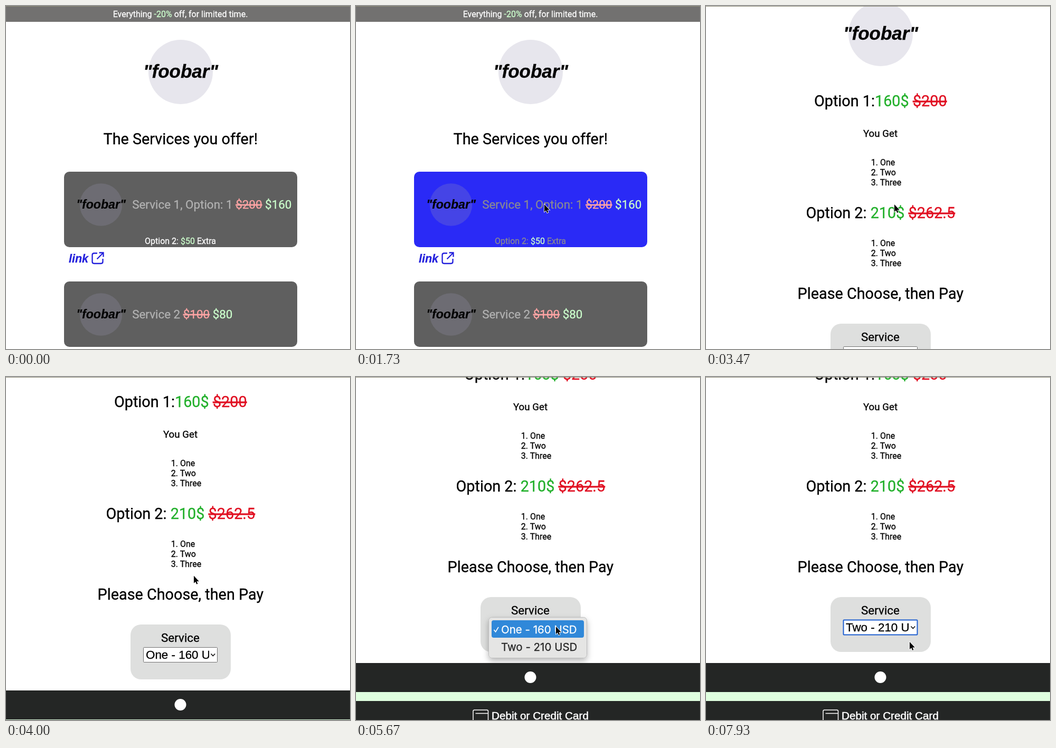
Write an HTML page that moves like this. It is 652 px wide and 650 px high and loops after 8 s.

```html
<!DOCTYPE html>
<html lang="en">
<head>
<meta charset="utf-8">
<title>Service shop</title>
<style>
  html, body { margin: 0; width: 100%; height: 100%; overflow: hidden; background: #fff; }
  svg { display: block; width: 652px; height: 650px; }
  text { font-family: Roboto, sans-serif; font-size: 16px; --ink: #000; }
  /* A hairline stroke gives the text its slightly heavier weight. */
  text, tspan { fill: var(--ink); stroke: var(--ink); stroke-width: .3px; }
  .mid { text-anchor: middle; }
  .h2 { font-size: 28.8px; }
  .h3 { font-size: 18.72px; }
  .big { font-size: 22.4px; }
  .white { --ink: #fff; }
  .pale { --ink: #b2b2b2; }
  .mint { --ink: #ccffcc; }
  .was { --ink: #ffa4a4; text-decoration: line-through #ff7878; }
  .now { --ink: #22b02b; }
  .old { --ink: #e00e20; text-decoration: line-through; }
  .name { font: italic bold 35px "Liberation Sans", sans-serif; }
  .link { font: italic bold 21.5px "Liberation Sans", sans-serif; --ink: #2320dc; }
  .field { font: 22.4px "Liberation Sans", sans-serif; }
  .item { font: 20.5px Inter, sans-serif; }
  .pay { font: 20.7px "Liberation Sans", sans-serif; stroke-width: .55px; }
</style>
</head>
<body>
<svg viewBox="0 0 652 650">
  <defs>
    <g id="logo">
      <circle r="61" fill="#9a98b4" opacity=".24"/>
      <text class="name mid" y="11">"foobar"</text>
    </g>
    <clipPath id="fieldClip"><rect x="261" y="742" width="124" height="28"/></clipPath>
    <filter id="shade" x="-20%" y="-30%" width="140%" height="180%">
      <feDropShadow dx="0" dy="5" stdDeviation="6" flood-opacity=".28"/>
    </filter>
  </defs>

  <g id="shop">
    <rect width="652" height="30" fill="#727170"/>
    <text class="white mid" x="330.5" y="21">Everything <tspan class="mint">-20%</tspan> off, for limited time.</text>
    <use href="#logo" x="331" y="125"/>
    <text class="h2 mid" x="330.8" y="262">The Services you offer!</text>

    <rect id="card" x="110" y="314" width="442" height="143" rx="10"/>
    <use href="#logo" transform="translate(180 376.5) scale(.66)"/>
    <text class="big" x="239.2" y="384"><tspan id="label">Service 1, Option: 1</tspan> <tspan class="was">$200</tspan> <tspan class="mint">$160</tspan></text>
    <text id="extra" class="mid" x="330.5" y="451">Option 2: <tspan class="mint">$50</tspan> Extra</text>

    <text class="link" x="119" y="486">link</text>
    <path d="M173 468.5H167Q163.500 468.500 163.500 472V484.500Q163.500 488 167 488H180Q183.500 488 183.500 484.500V479M176.500 467.500H184.500V475.500M184 468L172.500 479.500" fill="none" stroke="#2320dc" stroke-width="2.300"/>

    <rect x="110" y="522" width="442" height="124" rx="10" fill="#5f5f5f"/>
    <use href="#logo" transform="translate(180 584.5) scale(.66)"/>
    <text class="big pale" x="239.2" y="592">Service 2 <tspan class="was">$100</tspan> <tspan class="mint">$80</tspan></text>
  </g>

  <g id="order">
    <rect width="652" height="30" fill="#727170"/>
    <text class="white mid" x="330.5" y="21">Everything <tspan class="mint">-50%</tspan> off, for limited time.</text>
    <use href="#logo" x="331" y="150"/>
    <text class="h2 mid" x="330.8" y="287">Option 1:<tspan class="now">160$</tspan> <tspan class="old">$200</tspan></text>
    <text class="h3 mid" x="330.5" y="345">You Get</text>
    <g id="lists"></g>
    <text class="h2 mid" x="330.8" y="499">Option 2: <tspan class="now">210$</tspan> <tspan class="old">$262.5</tspan></text>
    <text class="h2 mid" x="330.8" y="652">Please Choose, then Pay</text>

    <rect x="236" y="699" width="190" height="104" rx="20" fill="#dedfde"/>
    <text class="big mid" x="330.5" y="732">Service</text>
    <rect id="field" x="260.5" y="742.5" width="140" height="28" rx="1" fill="#fff"/>
    <text id="value" class="field" x="265" y="764" clip-path="url(#fieldClip)"></text>
    <path d="M388.5 754.5L392.3 758.5L396.2 754.5" fill="none" stroke="#111" stroke-width="1.7"/>

    <rect y="824" width="652" height="55" fill="#242625"/>
    <circle cx="330.5" cy="851" r="11" fill="#fff"/>
    <rect y="879" width="652" height="17" fill="#dfffdf"/>
    <rect y="896" width="652" height="55" fill="#242625"/>
    <path d="M222 940V915.5Q222 913 224.5 913H248Q250.5 913 250.5 915.5V940M226.5 919.5H250" fill="none" stroke="#fff" stroke-width="1.5"/>
    <text class="pay white" x="257" y="931">Debit or Credit Card</text>
  </g>

  <g id="menu">
    <rect x="251.5" y="455.5" width="186" height="77" rx="6" fill="#e5e5e4" stroke="#bdbdbd" filter="url(#shade)"/>
    <rect id="mark" x="257" width="175" height="33" rx="4" fill="#3088d9"/>
    <path id="tick" d="M261.5 479L264.5 483L270 474" fill="none" stroke="var(--ink)" stroke-width="1.7"/>
    <text id="one" class="item" x="275" y="486">One - 160 USD</text>
    <text id="two" class="item" x="275" y="518.5">Two - 210 USD</text>
  </g>

  <rect width="652" height="1" fill="#8c8a76"/>
  <path id="cursor" d="M0 0V14L3.2 11.2L5.3 16L7.400 15.100L5.400 10.400H9.800Z" stroke="#fff" stroke-width="1.6" paint-order="stroke"/>
</svg>

<script>
const LOOP = 8000;
const $ = id => document.getElementById(id);
const show = (el, on) => el.style.display = on ? "" : "none";
const ink = (el, color) => el.style.setProperty("--ink", color);

// Rows are [time, value, ...]; each stretch is eased at both ends unless linear.
const CURSOR = [
  [70, 366, 8], [750, 360, 350], [1000, 360, 358], [1300, 360, 358],
  [1600, 357, 376], [3700, 357, 376], [4300, 355, 377.5],
  [4700, 355, 377.5], [5350, 379, 473], [6000, 379, 473],
  [6350, 379.5, 506], [7000, 379.5, 506], [7400, 386, 502]
];
const SCROLL = [[2830, 0], [3070, 18], [3470, 97], [3730, 166], [4000, 230], [4250, 268], [4430, 282]];
const HOVER = [[560, 0], [840, 1]];
const FADE = [[6900, 1], [7060, 0]];

const smooth = p => p * p * (3 - 2 * p);
const linear = p => p;
function at(rows, t, ease = smooth) {
  const next = rows.findIndex(r => r[0] > t);
  if (next === 0) return rows[0].slice(1);
  if (next < 0) return rows[rows.length - 1].slice(1);
  const a = rows[next - 1], b = rows[next];
  const p = ease((t - a[0]) / (b[0] - a[0]));
  return a.slice(1).map((v, i) => v + (b[i + 1] - v) * p);
}
const mix = (a, b, p) => `rgb(${a.map((v, i) => Math.round(v + (b[i] - v) * p))})`;

$("lists").innerHTML = [399, 552].map(top =>
  ["One", "Two", "Three"].map((word, i) =>
    `<text x="312.8" y="${top + i * 19}">${i + 1}. ${word}</text>`).join("")).join("");

function drawShop(t) {
  const [p] = at(HOVER, t);
  const dim = [138, 138, 146];
  $("card").style.fill = mix([95, 95, 95], [42, 42, 246], p);
  ink($("label"), mix([178, 178, 178], dim, p));
  ink($("extra"), mix([255, 255, 255], dim, p));
}

function drawOrder(t) {
  const [y] = at(SCROLL, t, linear);
  const chosen = t >= 6900;
  $("order").setAttribute("transform", `translate(0 ${-Math.round(y)})`);
  $("value").textContent = chosen ? "Two - 210 USD" : "One - 160 USD";
  $("field").style.stroke = chosen ? "#1f5fd0" : "#707070";
  $("field").style.strokeWidth = chosen ? 2 : 1;
}

function drawMenu(t) {
  const open = t >= 5670 && t < 7060;
  show($("menu"), open);
  if (!open) return;
  const second = at(CURSOR, t)[1] > 493;
  const blink = t >= 6740 && t < 6810;
  const color = on => on && !blink ? "#fff" : "#262626";
  $("menu").style.opacity = at(FADE, t, linear)[0];
  show($("mark"), !blink);
  $("mark").setAttribute("y", second ? 494 : 461);
  ink($("one"), color(!second));
  ink($("tick"), color(!second));
  ink($("two"), color(second));
}

function frame(now) {
  const t = now % LOOP;
  const ordering = t >= 1800;
  show($("shop"), !ordering);
  show($("order"), ordering);
  if (ordering) drawOrder(t); else drawShop(t);
  drawMenu(t);
  show($("cursor"), t >= 70);
  $("cursor").setAttribute("transform", `translate(${at(CURSOR, t)})`);
  requestAnimationFrame(frame);
}
frame(performance.now());
</script>
</body>
</html>
```
